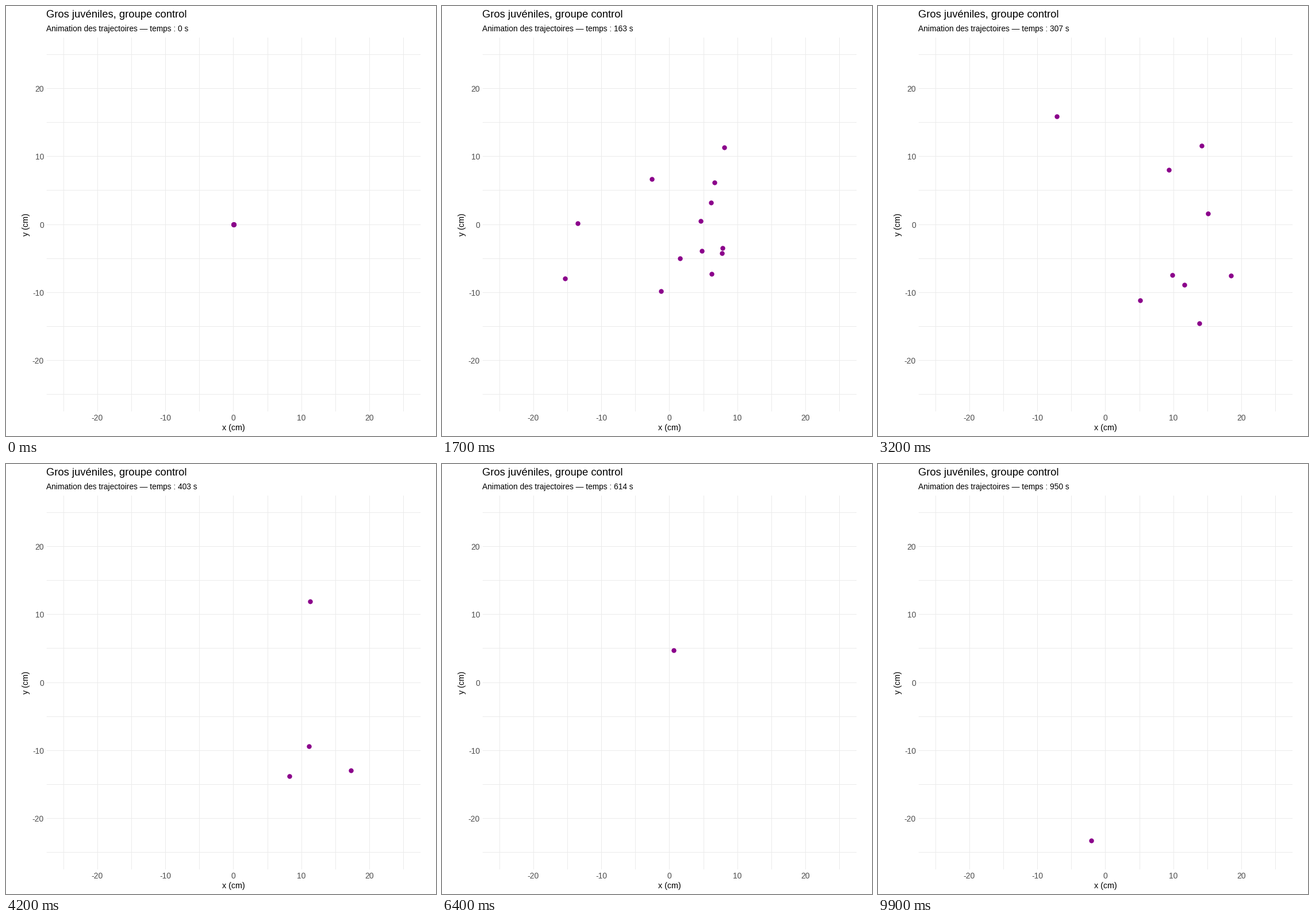
Write a matplotlib script that moves like this. It is 748 px wide and 748 px high and loops after 10000 ms.

```python
import matplotlib.pyplot as plt
import numpy as np
from matplotlib.animation import FuncAnimation
from matplotlib.collections import LineCollection

SIZE, FRAMES, LAST_SECOND = 748, 100, 950
CX, CY, SCALE = 395.4, 379.6, 11.825  # pixels per cm
REACH = 27.5 * SCALE
EDGE = 250  # radius at which an animal leaves the arena

# Every animal sets out from the centre and turns at these steps.
TURNS = (0, 11, 24, 42, 55, 64, 77, 83, 88, 99)
# Turning points in pixels from the centre, y downwards.
WALKS = [
    [-33-167j],
    [-118+61j],
    [-96+12j, -234-18j],
    [82-63j, 111-216j],
    [43-47j, 120-103j],
    [-9-35j, -56-130j],
    [4-1j, 112-12j],
    [40+34j, 150+68j],
    [37+52j, 115+126j],
    [-5+60j, -26+182j],
    [56-20j, 91-59j, 133-141j],
    [7+18j, 30+107j, 97+163j],
    [32+27j, 84+67j, 204+153j],
    [81+17j, 105+69j, 131+111j, 62-24j, 7-56j,
     -55+84j, -107+172j, -90+209j, -25+275j],
]


def place(step, walk):
    """Straight legs; past the last turn the animal keeps its heading."""
    points = [0, *walk]
    k = min(np.searchsorted(TURNS, step, side="right"), len(walk))
    t0, t1 = TURNS[k - 1:k + 1]
    z = points[k - 1] + (points[k] - points[k - 1]) * (step - t0) / (t1 - t0)
    gone = step > TURNS[len(walk)] and abs(z) > EDGE
    return None if gone else (CX + z.real, CY + z.imag)


def positions(step):
    return [p for p in (place(step, w) for w in WALKS) if p]


def subtitle(step):
    seconds = round(step * LAST_SECOND / (FRAMES - 1))
    return f"Animation des trajectoires — temps : {seconds} s"


plt.rcParams["font.family"] = "Liberation Sans"
fig = plt.figure(figsize=(SIZE / 72, SIZE / 72), dpi=72, facecolor="white")
ax = fig.add_axes([0, 0, 1, 1])
ax.set_xlim(-0.5, SIZE - 0.5)
ax.set_ylim(SIZE - 0.5, -0.5)
ax.axis("off")

grid = []
for v in range(-25, 26, 5):
    x, y = round(CX + v * SCALE), round(CY - v * SCALE)
    grid.append([(x, CY - REACH), (x, CY + REACH)])
    grid.append([(CX - REACH, y), (CX + REACH, y)])
ax.add_collection(LineCollection(grid, colors="#ebebeb", linewidths=1,
                                 capstyle="butt", snap=False))


def label(x, y, text, size=13.9, color="black", **kw):
    return ax.text(x, y, text, fontsize=size, color=color,
                   va="baseline", **kw)


for v in range(-20, 21, 10):
    label(CX + v * SCALE - 0.6, 720.6, str(v), color="#4d4d4d", ha="center")
    label(65.6, CY - v * SCALE + 5.6, str(v), color="#4d4d4d", ha="right")
label(CX, 737.6, "x (cm)", size=14.2, ha="center")
label(38.6, CY, "y (cm)", size=14.2, ha="center", rotation=90,
      rotation_mode="anchor")
label(69.7, 20, "Gros juvéniles, groupe control", size=18.4)
clock = label(69.7, 43.7, subtitle(0), size=13.8)

dots = ax.scatter([], [], s=8.4 ** 2, c="#8b008b", linewidths=0, zorder=3)
dots.set_antialiased(False)


def draw(step):
    dots.set_offsets(positions(step))
    clock.set_text(subtitle(step))
    return dots, clock


anim = FuncAnimation(fig, draw, frames=FRAMES, interval=100,
                     repeat=True, repeat_delay=0)
plt.show()
```
